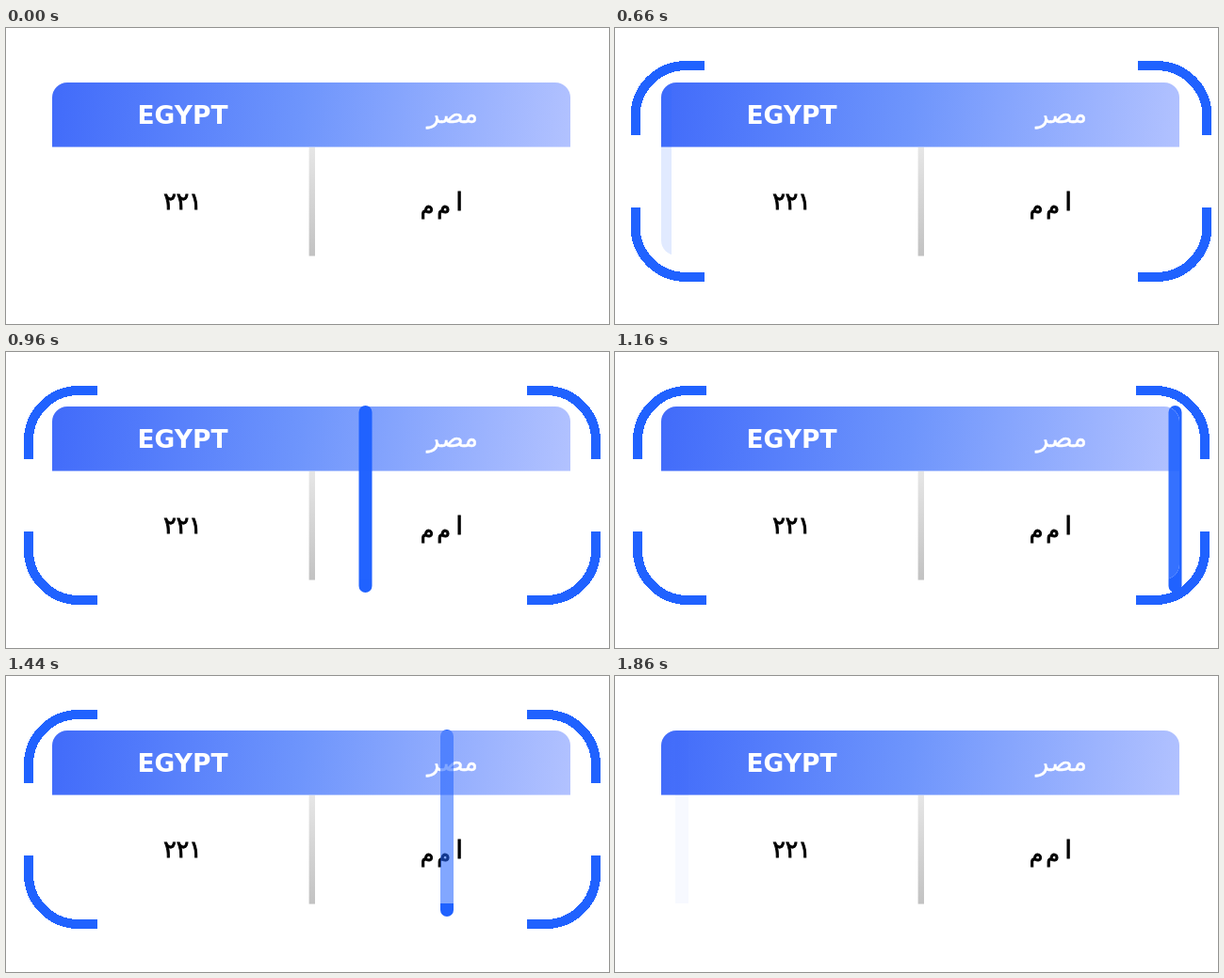
Write an HTML page that moves like this. It is 640 px wide and 315 px high and loops after 3 s.

```html
<!DOCTYPE html>
<html lang="en">
<head>
<meta charset="utf-8">
<title>Plate scan</title>
<style>
  html, body { margin: 0; width: 100%; height: 100%; overflow: hidden; background: #fff; }
  svg { display: block; width: 100%; height: 100%; }
  text { text-anchor: middle; font-family: "DejaVu Sans", sans-serif; }
  .country { font-size: 26.5px; font-weight: 700; }
  .heading { stroke: #fff; stroke-width: .4; }
  .plate { stroke: #000; stroke-width: .9; }
</style>
</head>
<body>
<svg viewBox="0 0 640 315">
  <defs>
    <linearGradient id="sky" gradientUnits="userSpaceOnUse" x1="49" y1="58" x2="599" y2="127">
      <stop offset="0" stop-color="#416bfa"/>
      <stop offset=".48" stop-color="#6e95fc"/>
      <stop offset="1" stop-color="#b2c2ff"/>
    </linearGradient>
    <linearGradient id="steel" x2="0" y2="1">
      <stop offset="0" stop-color="#e6e6e6"/>
      <stop offset="1" stop-color="#c2c2c2"/>
    </linearGradient>
    <clipPath id="card"><rect x="49" y="58" width="550" height="184" rx="16"/></clipPath>
    <rect id="bar" x="-7" y="57" width="14" height="199" rx="7" fill="#2062ff"/>
    <path id="corner" d="M-301-38.5V-58.5A53 53 0 0 1-248-111.5H-228"/>
  </defs>

  <use id="barBehind" href="#bar"/>
  <g clip-path="url(#card)">
    <rect x="49" y="58" width="550" height="184" fill="#fff"/>
    <rect x="49" y="58" width="550" height="68.6" fill="url(#sky)"/>
    <g fill="#fff">
      <text class="country" x="187.5" y="101.5">EGYPT</text>
      <text class="heading" x="474" y="101" font-size="27.5">مصر</text>
    </g>
    <g class="plate">
      <text x="187.5" y="192.5" font-size="25">٢٢١</text>
      <text x="481" y="193.5" font-size="26">ا</text>
      <text x="464.5" y="197" font-size="23">م</text>
      <text x="447" y="197" font-size="23">م</text>
    </g>
  </g>
  <rect x="321.6" y="127" width="6.4" height="115.6" fill="url(#steel)"/>
  <g clip-path="url(#card)"><use id="barFront" href="#bar"/></g>
  <g id="brackets" fill="none" stroke="#2062ff" stroke-width="10" shape-rendering="crispEdges">
    <use href="#corner"/>
    <use href="#corner" transform="scale(-1 1)"/>
    <use href="#corner" transform="scale(1 -1)"/>
    <use href="#corner" transform="scale(-1)"/>
  </g>
</svg>
<script>
const LOOP = 3000, STEP = 20, START = 480, END = 1860;
const byId = id => document.getElementById(id);
const [behind, front, brackets] = ['barBehind', 'barFront', 'brackets'].map(byId);
const clamp = v => Math.min(1, Math.max(0, v));
const progress = (t, from, to) => clamp((t - from) / (to - from));
const easeInOut = p => p < .5 ? 4 * p ** 3 : 1 - 4 * (1 - p) ** 3;

// Bar sweep: time in ms, centre x, speed in px/ms
const sweep = [
  [660, 53, 0], [960, 381.5, 1.7], [1160, 594.5, .25], [1200, 598, 0],
  [1440, 468, -.88], [1540, 372, -1.05], [1600, 306, -1.07], [1860, 71, -.55]
];

function barX(t) {
  const i = sweep.findIndex(k => k[0] >= t);
  if (i === 0) return sweep[0][1];
  const [t0, x0, v0] = sweep[i - 1], [t1, x1, v1] = sweep[i];
  const d = t1 - t0, s = (t - t0) / d, r = 1 - s;
  return x0 * r * r * (1 + 2 * s) + x1 * s * s * (3 - 2 * s)
    + d * s * r * (v0 * r - v1 * s);
}

function draw(time) {
  const t = Math.min(END, Math.floor(time % LOOP / STEP) * STEP);
  const move = `translate(${barX(t).toFixed(2)} 0)`;
  const alpha = easeInOut(progress(t, START, 1040)) * (1 - progress(t, 1080, 1890));
  front.setAttribute('transform', move);
  front.setAttribute('opacity', alpha);
  // Outside the card everything is either solid or hidden
  behind.setAttribute('transform', move);
  behind.setAttribute('visibility', alpha >= .5 ? 'visible' : 'hidden');
  const scale = 1.02 - .02 * progress(t, START, 780);
  brackets.setAttribute('transform', `translate(325 152.5) scale(${scale})`);
  brackets.setAttribute('visibility', t >= 620 && t < 1720 ? 'visible' : 'hidden');
}

const begin = performance.now();
function tick() {
  draw(performance.now() - begin);
  requestAnimationFrame(tick);
}
tick();
</script>
</body>
</html>
```
